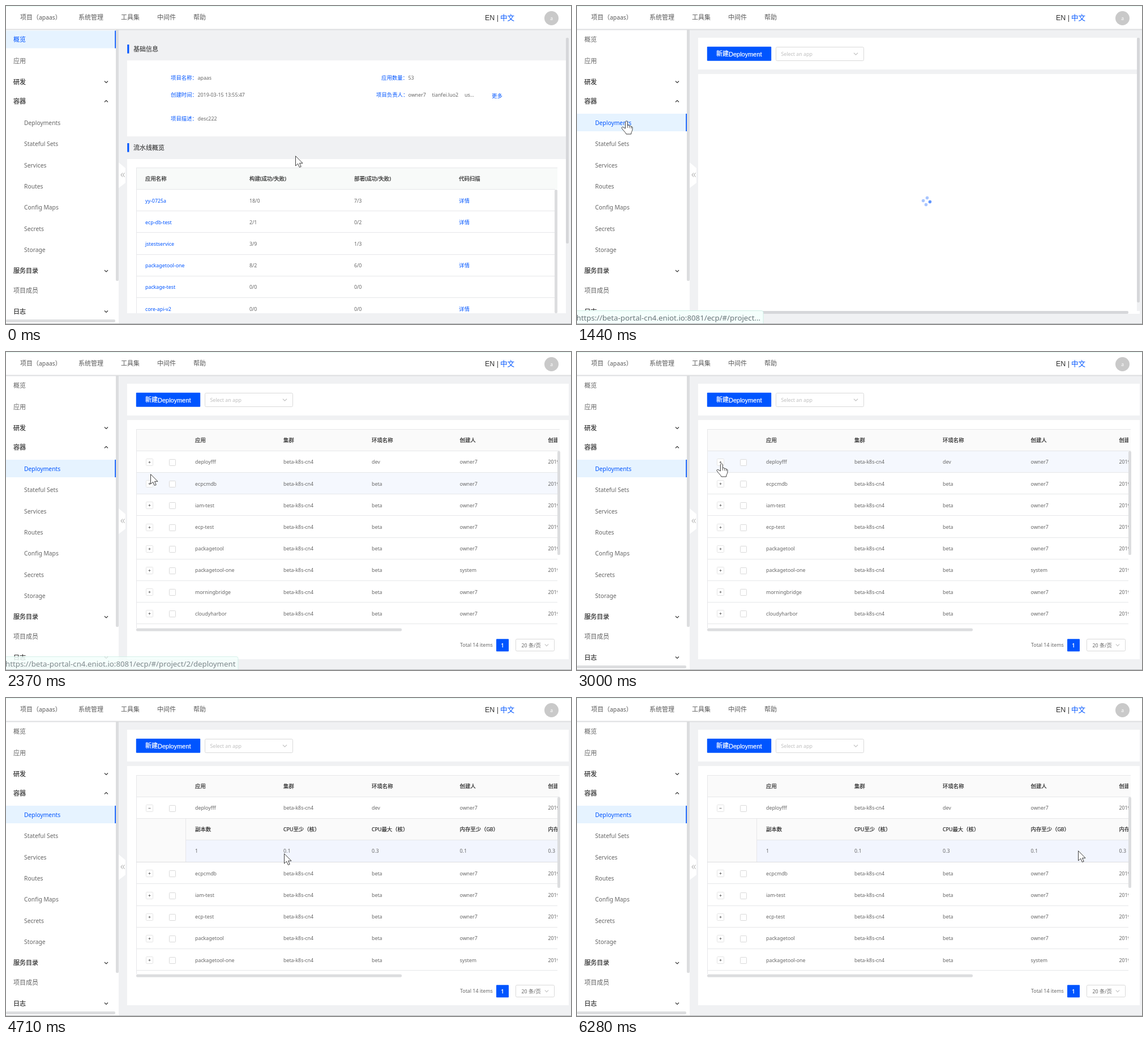
An HTML page for the animation above (6680 ms loop, 998 by 561 pixels).

```html
<!DOCTYPE html>
<html lang="zh">
<head>
<meta charset="utf-8">
<style>
html, body { margin: 0; width: 100%; height: 100%; overflow: hidden; background: #fff; }
svg { display: block; width: 998px; height: 561px; }
text { font-family: "Noto Sans", "Open Sans", sans-serif; white-space: pre; }
.c { font-family: "Noto Sans CJK SC", "Noto Sans CJK", sans-serif; }
.arial, .arial text { font-family: "Liberation Sans", Arial, sans-serif; }
</style>
</head>
<body>
<svg id="stage" viewBox="0 0 998 561"></svg>
<script>
const LOOP = 6680, BLUE = '#0055ff', GREY = '#666', DARK = '#262626', LINE = '#e6e7e9';

// ---------- drawing helpers (y is the vertical middle of a text line) ----------
const rect = (x, y, w, h, fill, more = '') =>
  `<rect x="${x}" y="${y}" width="${w}" height="${h}" fill="${fill}" ${more}/>`;
const hline = (x, y, w, color = LINE) => rect(x, y, w, 1, color);
const box = (x, y, w, h, color = '#d9d9d9', r = 1) =>
  rect(x + .5, y + .5, w - 1, h - 1, '#fff', `stroke="${color}" rx="${r}"`);
const stroke = (d, color, w = 1, more = '') =>
  `<path d="${d}" fill="none" stroke="${color}" stroke-width="${w}" ${more}/>`;
const bar = (x, y, w, h, color = '#dcdddf') => rect(x, y, w, h, color, 'rx="2"');

function text(x, y, s, { size = 9.4, fill = GREY, strong = 0, more = '' } = {}) {
  const runs = s.replace(/[\u3000-\u9fff\uff00-\uffef]+/g,
    m => `<tspan class="c" font-size="${size}">${m}</tspan>`);
  const weight = strong ? `stroke="${fill}" stroke-width="${strong}"` : '';
  return `<text x="${x}" y="${y + size * .36}" font-size="${size * .94}" fill="${fill}" ${weight} ${more}>${runs}</text>`;
}
const link = (x, y, s) => text(x, y, s, { fill: BLUE });
const head = (x, y, s) => text(x, y, s, { fill: DARK, strong: .2 });
const chevron = (x, y, up, color = '#333', r = 3) => {
  const d = up ? -r / 2 : r / 2;
  return stroke(`M${x - r} ${y - d}L${x} ${y + d}L${x + r} ${y - d}`, color, 1.1);
};
const group = (id, body) => `<g id="${id}">${body}</g>`;

// ---------- frame of the page ----------
const MENU = [
  [59, '概览'], [97, '应用'], [134, '研发', 'down'], [168, '容器', 'up'],
  [206, 'Deployments'], [243.5, 'Stateful Sets'], [281, 'Services'], [318, 'Routes'],
  [355.5, 'Config Maps'], [393, 'Secrets'], [430.5, 'Storage'],
  [467.5, '服务目录', 'down'], [502, '项目成员'], [539, '日志', 'down'],
];

function sidebar() {
  const items = MENU.map(([y, s, arrow]) => {
    const sub = /[a-z]/.test(s);
    const id = s === 'Deployments' ? 'id="deploy"' : s === '概览' ? 'id="overview"' : '';
    return text(sub ? 32 : 13, y, s, { size: 11, fill: arrow ? DARK : GREY, strong: arrow ? .2 : 0, more: id })
      + (arrow ? chevron(177, y, arrow === 'up') : '');
  }).join('');
  return rect(0, 41, 199, 520, '#fff')
    + group('picked', rect(0, 0, 192.5, 31, '#e6f3ff') + rect(192.3, 0, 1.7, 31, BLUE))
    + items + bar(194, 41, 5, 444) + bar(0, 553, 193, 5)
    + '<path d="M199 276L211 286V312L199 321Z" fill="#fff"/>'
    + stroke('M206 294.5L203 298L206 301.5M209.5 294.5L206.5 298L209.5 301.5', '#8c8c8c', .9);
}

function header() {
  const nav = [[25, '项目（apaas）'], [128, '系统管理'], [203, '工具集'], [267, '中间件'], [331, '帮助']];
  return rect(0, 41, 998, 1, '#dfe0e2') + rect(0, 42, 998, 1, '#d0d2d5', 'opacity=".35"')
    + rect(0, 0, 998, 41, '#fff') + hline(0, 0, 998, '#e4faf3') + hline(0, 40, 998, '#ececed')
    + nav.map(([x, s]) => text(x, 20.2, s, { size: 11, fill: '#595959' })).join('')
    + `<g class="arial">${text(846, 20.5, 'EN |', { size: 13.2, fill: '#333' })}</g>`
    + text(873, 20.5, '中文', { size: 12.6, fill: BLUE })
    + '<circle cx="963.5" cy="21.5" r="12.5" fill="#c9c9c9"/>'
    + text(963.5, 22, 'a', { size: 9, fill: '#fff', more: 'text-anchor="middle"' });
}

// ---------- pages ----------
function overview() {
  const title = (y, s) => rect(214.3, y - 8, 3.1, 15.6, BLUE) + text(225, y, s, { size: 11, fill: '#333', strong: .1 });
  const fields = [
    [291, 127, '项目名称：', 'apaas'], [663, 127, '应用数量：', '53'],
    [291, 157, '创建时间：', '2019-03-15 13:55:47'], [654, 157, '项目负责人：', 'owner7'],
    [291, 199, '项目描述：', 'desc222'],
  ];
  const rows = [
    ['yy-0725a', '18/0', '7/3', 1], ['ecp-db-test', '2/1', '0/2', 1], ['jstestservice', '3/9', '1/3', 0],
    ['packagetool-one', '8/2', '6/0', 1], ['package-test', '0/0', '0/0', 0], ['core-api-v2', '0/0', '0/0', 1],
  ];
  const table = rows.map(([name, build, deploy, scan], i) => {
    const y = 343.5 + i * 38.15;
    return link(246, y, name) + text(430, y, build) + text(615, y, deploy)
      + (scan ? link(800, y, '详情') : '')
      + hline(230, Math.round(323 + i * 38.2), 740);
  }).join('');
  return title(76, '基础信息') + rect(214, 96, 775, 134, '#fff')
    + fields.map(([x, y, k, v]) => link(x, y, k) + text(x < 400 ? 338.5 : 710.5, y, v)).join('')
    + text(752.5, 157, 'tianfei.luo2') + text(810, 157, 'us...') + link(858, 158.5, '更多')
    + title(250, '流水线概览') + rect(214, 270, 775, 272, '#fff')
    + rect(230, 285, 744, 38, '#f8faf9') + hline(230, 285, 744) + rect(230, 285, 1, 257, LINE)
    + ['应用名称', '构建(成功/失败)', '部署(成功/失败)', '代码扫描']
      .map((s, i) => head([246, 430, 615, 800][i], 305, s)).join('')
    + table + bar(969, 324, 5, 218) + bar(989, 56, 5, 363, '#d6d7da');
}

const toolbar = w => rect(214, 56, w, 56, '#fff') + rect(229.8, 71.7, 113.4, 25.1, BLUE, 'rx="1"')
  + text(246, 84.5, '新建', { size: 11, fill: '#fff', strong: .25 })
  + `<g class="arial">${text(268, 84.5, 'Deployment', { size: 11.7, fill: '#fff', strong: .25 })}</g>`
  + box(351, 72, 156, 25, '#d9d9d9', 2) + text(360.5, 85, 'Select an app', { fill: '#bfbfbf' })
  + chevron(492.5, 84.5, false, '#c4c4c4', 3.5);

function loading() {
  const dots = [0, 1, 2, 3].map(i => {
    const a = i * Math.PI / 2;
    return `<circle cx="${6 * Math.cos(a)}" cy="${6 * Math.sin(a)}" r="2.8" fill="${BLUE}" opacity="${i ? .34 : .62}"/>`;
  }).join('');
  return toolbar(775) + rect(214, 120, 775, 423, '#fff') + rect(989, 538, 5, 5, '#fff')
    + bar(214, 538, 760, 5, '#d6d7da') + bar(989, 56, 5, 467, '#d6d7da')
    + group('spinner', dots);
}

const COLS = [334, 490, 646, 801.5, 957.5], PITCH = 38.2;
const APPS = ['deployfff', 'ecpcmdb', 'iam-test', 'ecp-test', 'packagetool', 'packagetool-one', 'morningbridge', 'cloudyharbor'];
const cells = (y, list, draw = text) => list.map((s, i) => draw(COLS[i], y, s)).join('');

function deployments(open) {
  const shift = i => open && i ? 77.2 : 0;
  const rows = APPS.slice(0, open ? 6 : 8).map((app, i) => {
    const y = 194 + i * PITCH + shift(i), top = Math.round(y);
    return box(247, top - 6, 13, 13, '#e4e4e4')
      + stroke(`M251.5 ${top + .5}h4${open && !i ? '' : 'm-2 -2v4'}`, '#666', .9)
      + box(288, top - 5, 12, 12)
      + cells(y, [app, 'beta-k8s-cn4', i ? 'beta' : 'dev', i === 5 ? 'system' : 'owner7', '2019-03-15'])
      + hline(230, Math.round(212 + i * PITCH + shift(i)), 744);
  }).join('');
  const nested = !open ? '' : rect(231, 213, 743, 76, '#fafafa')
    + group('nestedHover', rect(318, 251, 656, 38, '#f2f5fe'))
    + rect(317, 213, 1, 76, LINE) + hline(318, 250, 656) + hline(230, 289, 744, '#dcdddf')
    + cells(232, ['副本数', 'CPU至少（核）', 'CPU最大（核）', '内存至少（GB）', '内存最大（GB）'], head)
    + cells(270, ['1', '0.1', '0.3', '0.1', '0.3']);
  return toolbar(780) + rect(214, 120, 780, 422, '#fff')
    + rect(230, 136, 748, 38, '#fafafa') + hline(230, 136, 748) + hline(230, 174, 748)
    + rect(230, 136, 1, 351, LINE)
    + group(open ? 'hoverOpen' : 'hover', rect(231, 175, 743, 37, '#f5f8fe'))
    + `<g clip-path="url(#tableClip)">${cells(155.5, ['应用', '集群', '环境名称', '创建人', '创建时间'], head)}${nested}${rows}</g>`
    + bar(974, 175, 5, open ? 160 : 183) + bar(230, 487.6, 469, 5)
    + text(802, 517, 'Total 14 items') + rect(866, 506.3, 22, 22, BLUE, 'rx="1"')
    + text(877, 517.5, '1', { fill: '#fff', strong: .4, more: 'text-anchor="middle"' })
    + box(900, 506, 69, 22, '#d9d9d9', 2) + text(910.5, 518, '20 条/页') + chevron(955, 517, false, '#c4c4c4', 3.2);
}

const URL_HEAD = 'https://beta-portal-cn4.eniot.io:8081/ecp/#/project';
const urlText = (id, s) => group(id, text(-1, 549.6, s, { size: 14.1, fill: '#6a757a' }));
const status = rect(-4, 537.5, 333, 28, '#f4fffc', 'id="urlBox" stroke="#cfeee6" rx="3"')
  + urlText('urlShort', URL_HEAD + '...')
  + `<g clip-path="url(#urlClip)">${urlText('urlLong', URL_HEAD + '/2/deployment')}</g>`;

const ARROW = 'M.5 .7V18L4.6 14.2L7.4 20.5L10.2 19.3L7.5 13.3H13Z';
const HAND = 'M-.6 14V3C-.6 .3 3.3 .3 3.3 3V9C4 7.8 6.6 8 6.8 10C7.5 9 9.6 9.3 9.8 11C11 10.4 12.2 11.3 12 13C12 18 11 19 10 21L9.6 24H1C0 21 -5 17 -7 13.5C-7.6 11.5 -5.5 10.8 -4 12Z';
const pointer = d => `<path d="${d}" fill="#fff" stroke="#333" stroke-width=".95" stroke-linejoin="round"/>`;

const stage = document.getElementById('stage');
stage.innerHTML = `<defs>
  <clipPath id="tableClip"><rect x="230" y="136" width="744" height="352"/></clipPath>
  <clipPath id="urlClip"><rect id="urlCut" x="0" y="537" width="411" height="24"/></clipPath></defs>`
  + rect(0, 0, 998, 561, '#f0f1f3') + sidebar()
  + group('pageOverview', overview()) + group('pageLoading', loading())
  + group('pageList', deployments(false)) + group('pageOpen', deployments(true))
  + header() + group('status', status) + hline(0, 560, 998, '#b4b6b8')
  + '<circle id="flash" r="14" fill="#fff200" opacity=".62"/>'
  + group('cursor', group('arrow', pointer(ARROW)) + group('hand', pointer(HAND) + stroke('M3.3 9V13M6.8 10V13.5M9.8 11V14', '#333', .8)));

// ---------- motion ----------
const $ = id => document.getElementById(id);
const show = (id, on) => $(id).style.display = on ? '' : 'none';

const evenly = (from, to) => Array.from({ length: 9 }, (_, i) => Math.round(from + (to - from) * i / 8));
// Each move: step times, start, control point, end.
const MOVES = [
  [evenly(70, 660), [511, 264], [280, 168], [86, 202]],
  [[1930, 2000, 2070, 2140, 2300, 2370, 2450, 2530, 2610, 2690], [86, 202], [312, 233.6], [254, 196]],
  [evenly(3570, 4160), [254, 196], [285, 266], [357, 273]],
  [evenly(4250, 4860), [357, 273], [444, 279], [529, 271.5]],
  [evenly(4940, 5580), [529, 271.5], [634, 257], [740, 272]],
  [evenly(5650, 6280), [740, 272], [812, 284], [885, 269]],
];

function cursorAt(t) {
  let pos = MOVES[0][1];
  for (const [times, a, b, c] of MOVES) {
    const done = times.filter(x => x <= t).length;
    if (!done) break;
    const k = done / times.length, r = 1 - k;
    pos = [0, 1].map(i => r * r * a[i] + 2 * r * k * b[i] + k * k * c[i]);
  }
  return pos.map(Math.round);
}

function draw(t) {
  const [x, y] = cursorAt(t);
  const picked = t >= 1130;
  const overItem = x < 194 && y >= 190 && y < 222;
  const overPlus = t >= 2690 && t < 3570;

  show('pageOverview', t < 1130);
  show('pageLoading', picked && t < 1520);
  show('pageList', t >= 1520 && t < 3150);
  show('pageOpen', t >= 3150);

  $('picked').setAttribute('transform', `translate(0 ${picked ? 190 : 43.5})`);
  $('overview').setAttribute('fill', picked ? GREY : BLUE);
  $('deploy').setAttribute('fill', picked || overItem ? BLUE : GREY);

  const turn = 9.5 + (Math.floor((t - 1130) / 77.5) - 4) * 23.25;
  $('spinner').setAttribute('transform', `translate(617.5 344.5) rotate(${turn})`);

  const row = Math.floor((y - 174) / PITCH);
  show('hover', x > 230 && row >= 0);
  $('hover').setAttribute('transform', `translate(0 ${Math.round(row * PITCH)})`);
  show('hoverOpen', x > 230 && row === 0);
  show('nestedHover', x > 318 && y >= 250 && y < 289);

  const wide = t >= 1930;
  const urlWidth = wide ? [350, 380, 400, 410][Math.min(3, Math.floor((t - 1930) / 70))] : 329;
  show('status', t >= 920 && t < 2450);
  $('status').setAttribute('opacity', t >= 2370 ? .85 : 1);
  $('urlBox').setAttribute('width', urlWidth + 4);
  $('urlCut').setAttribute('width', urlWidth);
  show('urlShort', !wide);
  show('urlLong', wide);

  show('flash', (t >= 980 && t < 1130) || (t >= 2840 && t < 3000));
  $('flash').setAttribute('cx', x);
  $('flash').setAttribute('cy', y);

  const hand = (overItem && t >= 760) || overPlus;
  show('hand', hand);
  show('arrow', !hand);
  $('cursor').setAttribute('transform', `translate(${x} ${y})`);
}

const start = performance.now();
function tick() {
  draw((performance.now() - start) % LOOP);
  requestAnimationFrame(tick);
}
tick();
</script>
</body>
</html>
```
